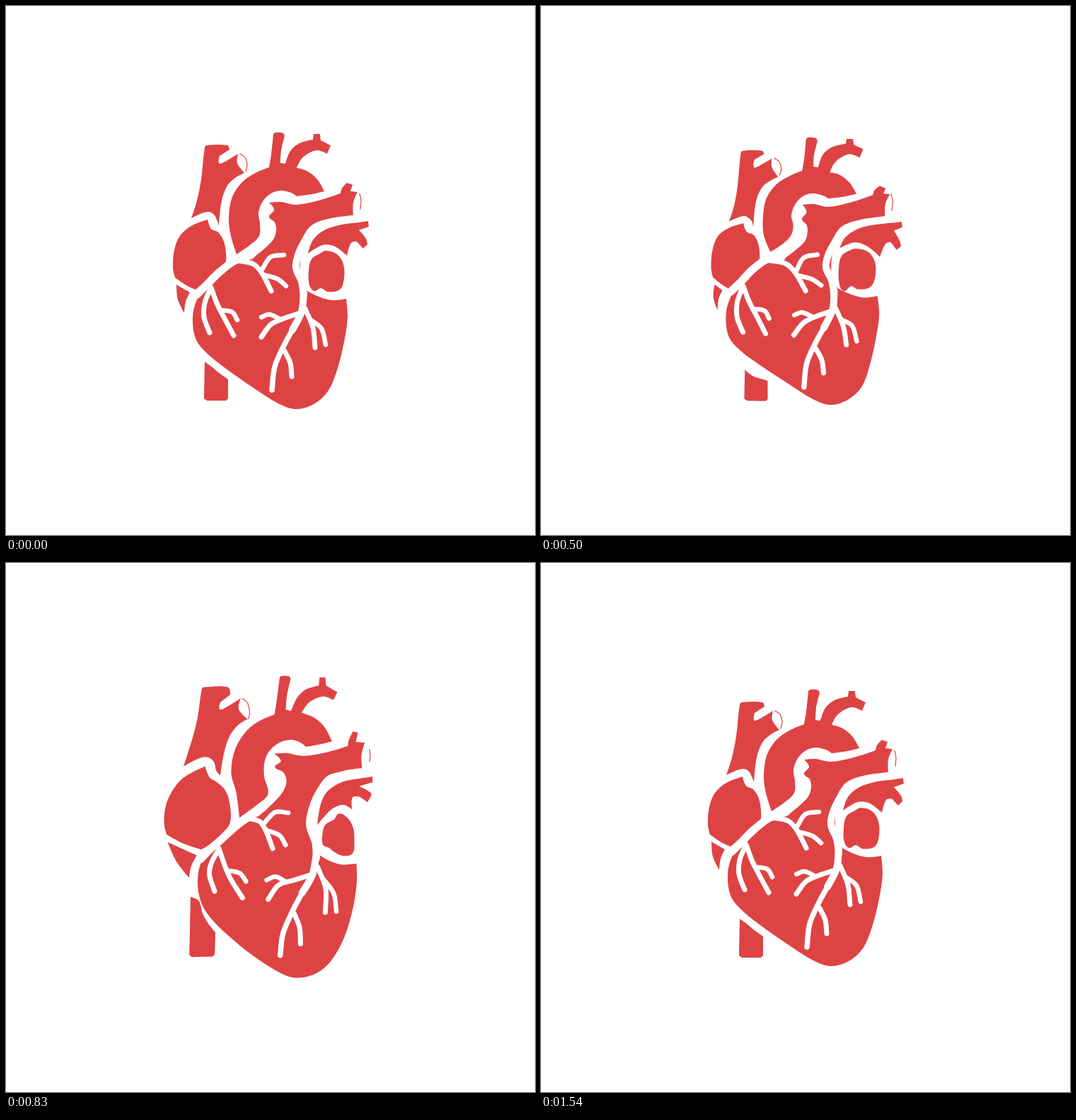
An HTML page for the animation above (1.62 s loop, 748 by 748 pixels).

```html
<!DOCTYPE html>
<html lang="en">
<head>
<meta charset="utf-8">
<title>Beating heart</title>
<style>
  html, body { margin: 0; width: 100%; height: 100%; overflow: hidden; background: #fff; }
  svg { display: block; width: 100%; height: 100%; }
</style>
</head>
<body>
<svg id="heart" viewBox="0 0 748 748"></svg>
<script>
const RED = '#de4344', WHITE = '#fff';
const LOOP = 1620, STEP = 1000 / 24, REST_FROM = 27;

// How far the heart is swollen at each step of one beat (negative = contracted).
const BEAT = [0, 0, .2, .55, .88, 1, .69, .38, .12, -.08, -.22, -.3, -.25, 0];

// Points of each part at rest and fully swollen; "!" marks a sharp corner.
const FILLS = [
  // vena cava
  ['281,200 284,197 313,197 316,203! 302,212! 301,222 306,222 328,209! 327,222 337,236! 324,243 313,254 305,275 301,310! 298,302 294,295 287,291 277,293 262,300! 270,275 276,245',
   '275,168 278,166 314,166 318,178! 304,190! 302,199 308,199 334,183! 330,200 344,214! 331,222 318,240 310,265 304,296! 297,290 294,275 284,267 270,269 246,282! 258,245 268,210'],
  // aorta
  ['326,351! 318,325 315,300 320,270 335,248 355,235 372,228! 375,210 378,181! 381,179 392,180 394,184! 389,205 388,222! 395,223! 402,205 415,194 434,189! 435,181! 444,181! 445,190! 459,197! 454,209! 441,204 430,207 418,216 411,229! 425,233 440,245 450,262! 433,266 411,269! 403,264 388,261 373,266 362,278 357,293 359,308 358,325 345,338',
   '332,364! 329,325 320,295 326,260 343,232 362,217 383,208! 386,190 391,153! 394,151 405,152 406,156! 401,180 399,201! 407,203! 416,184 428,172 446,166! 447,153! 455,153! 456,166! 473,176! 467,187! 454,182 443,184 432,190 421,204! 440,212 455,226 466,248! 450,252 430,256! 422,249 408,245 390,250 376,262 369,278 368,300 376,327 360,343'],
  // pulmonary artery and ventricles
  ['372,278! 388,277 410,281 442,275 473,265! 475,258 482,250! 490,253! 487,262! 497,263! 491,278 491,297! 460,303 435,313 420,340 416,375 426,403! 440,410 460,416 481,414! 483,440 478,475 468,515 455,545 435,563 410,570 385,562 350,540 310,512 283,490 268,470 264,440 270,415 282,397 300,379 322,361 347,358! 376,333 382,318 380,306 372,298 379,288',
   '382,266! 400,265 425,269 460,264 488,256! 489,248 494,233! 501,234! 498,249! 512,250! 508,268 509,287! 485,290 458,300 442,335 438,370 453,419! 465,426 480,431 502,430! 502,455 496,495 482,538 462,570 440,588 412,594 390,588 350,563 310,528 288,502 278,480 274,455 278,428 290,412 308,396 335,372 362,358! 392,328 403,308 398,292 384,284 393,276'],
  // pulmonary veins
  ['427,350! 434,331 450,317 475,309 500,306 512,304! 513,312! 499,317! 509,329 511,337! 505,343! 496,333! 488,335 482,353! 465,340 448,338',
   '446,380! 450,345 457,325 475,310 495,305 521,301! 521,309! 499,315! 519,323 518,327! 514,336! 503,330! 491,330 493,347! 483,343 466,353'],
  // left auricle
  ['428,375 432,358 444,350 452,346 468,351 477,365 478,385 472,401 455,404 445,399 436,403 429,395',
   '456,390 460,376 473,368 479,358 489,364 497,378 499,397 498,415 484,418 470,411 467,403 457,400'],
  // right atrium
  ['246,325 262,311 285,302! 290,315 300,320 308,333 311,350 310,364 298,378 284,388 268,401! 255,395 239,384! 236,370 238,345',
   '228,325 245,301 280,281! 287,298 297,305 310,315 318,332 320,368 306,388 294,400 280,407! 250,398 222,384! 218,368 220,345'],
  // sliver below the atrium
  ['241,394! 260,405! 254,418 252,434! 243,415',
   '223,395! 274,417! 265,435 262,450! 240,425'],
  // lower vena cava
  ['281,503! 292,511 300,518 307,523 314,528! 314,555! 311,558! 284,558! 280,555!',
   '252,458! 264,463 268,485 276,503 288,520! 287,552! 284,556! 253,557! 250,554!']
];

const LINES = [
  // vessel rims
  [1.2, '331,209 338,214 341,225 339,234', '336,184 343,190 346,205 345,214', RED],
  [1.2, '500,265 502,275 501,287', '520,263 521,270 520,278', RED],
  // coronary band down the right
  [10, '497,300 460,305 435,314 422,333 413,352 410,370 418,390 421,410', '517,294 485,298 463,307 448,328 440,352 438,372 446,398 447,420'],
  [10, '421,405 418,432 405,458', '447,415 440,445 425,470'],
  [7.5, '405,458 393,480 380,510 376,543', '425,470 412,495 397,530 393,560'],
  [7, '394,488 402,505 404,524', '414,500 421,520 422,545'],
  [7, '416,434 395,441 375,450 361,468', '441,443 412,452 390,458 375,479'],
  [6.5, '388,443 372,436 361,440', '400,455 385,447 372,452'],
  [7, '423,428 434,455 437,483', '448,430 460,462 458,499'],
  [6.5, '431,444 446,456 452,479', '455,446 471,472 474,499'],
  // coronary band on the left
  [11, '347,352 322,361 300,378 285,393 270,408', '372,342 333,372 305,398 289,411 277,424'],
  [7, '289,400 281,420 280,440 288,462', '306,408 295,425 291,440 298,465'],
  [7, '290,398 298,420 308,440 322,466', '306,406 314,430 322,450 340,477'],
  [6.5, '303,430 320,433 327,444', '318,437 335,441 345,453'],
  // upper twig
  [7, '328,360 350,365 362,378 375,403', '352,362 363,366 370,379 378,404'],
  [6.5, '362,373 374,355 393,352', '366,366 384,351 402,354'],
  [6.5, '364,380 384,386 396,396', '371,377 388,385 395,400']
];

const parse = s => s.split(' ').map(p => ({ xy: p.split(',').map(parseFloat), sharp: p.endsWith('!') }));
const svg = document.getElementById('heart');

function addPart(rest, full, closed, attrs) {
  const el = document.createElementNS('http://www.w3.org/2000/svg', 'path');
  for (const name in attrs) el.setAttribute(name, attrs[name]);
  svg.append(el);
  return { el, a: parse(rest), b: parse(full), closed };
}

const parts = [
  ...FILLS.map(([a, b]) => addPart(a, b, true, { fill: RED })),
  ...LINES.map(([width, a, b, color = WHITE]) => addPart(a, b, false, {
    fill: 'none', stroke: color, 'stroke-width': width,
    'stroke-linecap': 'round', 'stroke-linejoin': 'round'
  }))
];

// Smooth curve through the blended points.
function outline({ a, b, closed }, k) {
  const n = a.length;
  const pts = a.map((p, i) => p.xy.map((v, j) => v + (b[i].xy[j] - v) * k));
  const at = i => closed ? pts[(i + n) % n] : pts[Math.max(0, Math.min(n - 1, i))];
  const dirs = pts.map((p, i) => {
    if (a[i].sharp) return [0, 0];
    const [x0, y0] = at(i - 1), [x1, y1] = at(i + 1);
    const len = Math.hypot(x1 - x0, y1 - y0) || 1;
    return [(x1 - x0) / len, (y1 - y0) / len];
  });
  let d = 'M' + pts[0];
  for (let i = 0; i < (closed ? n : n - 1); i++) {
    const j = (i + 1) % n, [x0, y0] = pts[i], [x1, y1] = pts[j];
    const r = Math.hypot(x1 - x0, y1 - y0) / 3;
    d += 'C' + [x0 + dirs[i][0] * r, y0 + dirs[i][1] * r,
                x1 - dirs[j][0] * r, y1 - dirs[j][1] * r, x1, y1].map(v => v.toFixed(2));
  }
  return closed ? d + 'Z' : d;
}

let shown = null;
function draw(now) {
  const step = Math.floor((now % LOOP + 5) / STEP);
  const k = step < REST_FROM ? BEAT[step % BEAT.length] : 0;
  if (k !== shown) {
    for (const part of parts) part.el.setAttribute('d', outline(part, k));
    shown = k;
  }
}

const start = performance.now();
function tick() {
  draw(performance.now() - start);
  requestAnimationFrame(tick);
}
tick();
</script>
</body>
</html>
```
